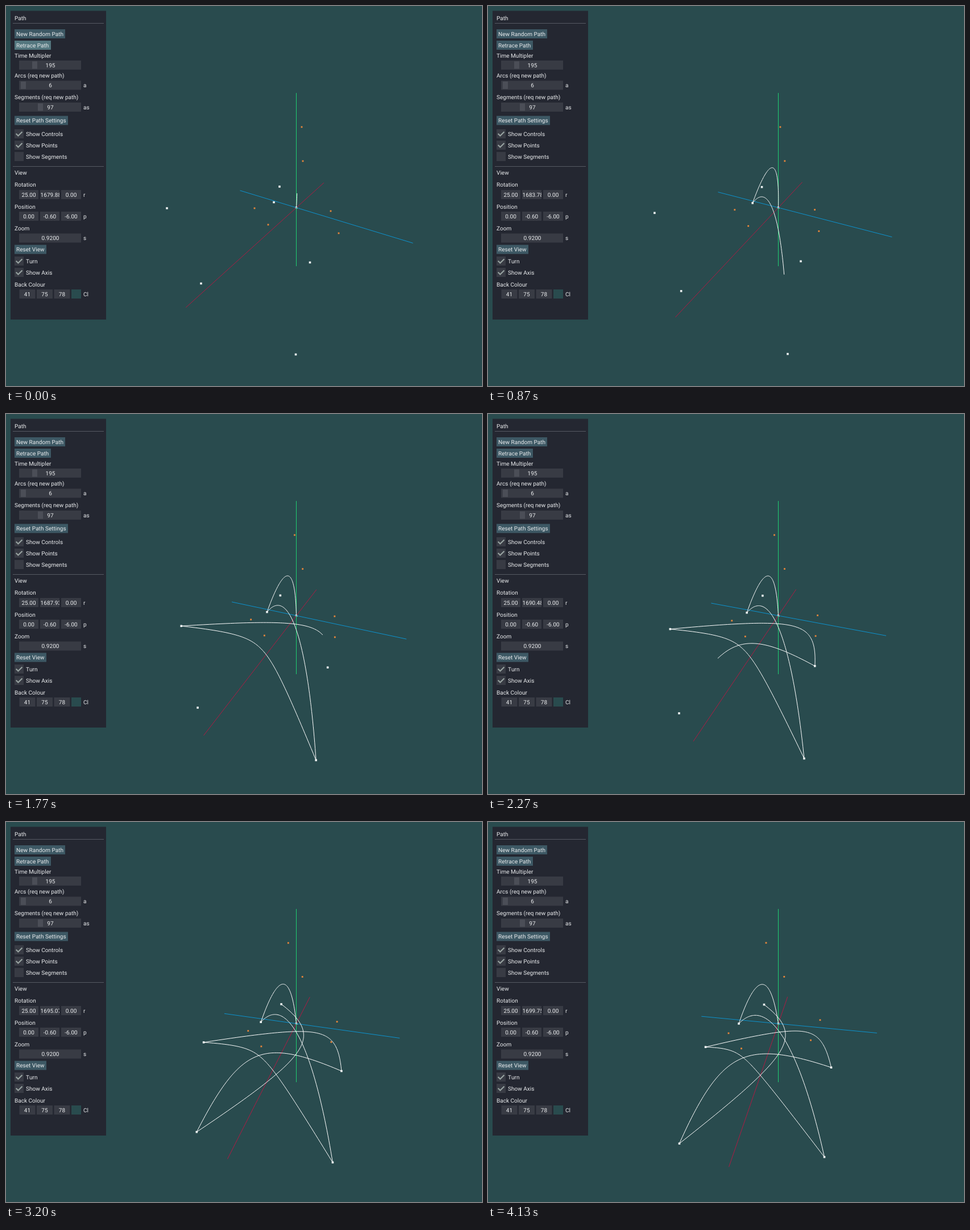
Recreate the animation shown at these times as an HTML page with a canvas. Size 837 px wide and 669 px high, loop 4.16 s.

```html
<!DOCTYPE html>
<html lang="en">
<head>
<meta charset="utf-8">
<title>Path viewer</title>
<style>
html, body { margin: 0; width: 100%; height: 100%; overflow: hidden; background: #294b4e; }
canvas, #panel { position: absolute; left: 0; top: 0; }
text {
  font: 10.05px Roboto, sans-serif; font-kerning: none;
  text-rendering: geometricPrecision; fill: #e9ebed; white-space: pre;
}
</style>
</head>
<body>
<canvas id="scene" width="837" height="669"></canvas>
<svg id="panel" width="837" height="669"></svg>
<script>
const LOOP = 4160, SEGMENTS = 97, ARCS_PER_MS = 0.00201, FIRST_ARC = 0.09;
const HOVER_END = 130;
const PITCH = 25 * Math.PI / 180, SCALE = 0.92, SHIFT_Y = -0.6, DISTANCE = 6;
const CENTER = [510.5, 334.4], FOCAL = [201.4, 206];
const BUTTON = '#3d5864', BUTTON_HOVER = '#54777f', FIELD = '#383b44', GRAB = '#4b4e57';

// ---- Control panel ----
const panel = document.getElementById('panel');

function add(tag, attrs, parent = panel) {
  const node = document.createElementNS('http://www.w3.org/2000/svg', tag);
  for (const key in attrs) node.setAttribute(key, attrs[key]);
  return parent.appendChild(node);
}
const rect = (x, y, width, height, fill) => add('rect', { x, y, width, height, fill });

// y is the vertical middle of the text
function label(x, y, str, anchor = 'start', parent = panel) {
  const node = add('text', { x, y: y + 3.6, 'text-anchor': anchor }, parent);
  node.textContent = str;
  return node;
}
function button(y, width, str) {
  const box = rect(15, y - 8, width, 16, BUTTON);
  label(18, y, str);
  return box;
}
function field(x, y, width, str) {
  rect(x, y - 8, width, 16, FIELD);
  label(x + width / 2, y, str, 'middle');
}
function slider(y, str, grab) {
  rect(23, y - 8, 109, 16, FIELD);
  if (grab) rect(grab, y - 6.5, 9, 13, GRAB);
  label(78, y, str, 'middle');
}
function checkbox(y, str, checked) {
  rect(15, y - 8, 16, 16, FIELD);
  if (checked) add('path', {
    d: `M17.7 ${y - 0.2}l3.7 3.7l7.1-7.1`, fill: 'none', stroke: '#98a3a1', 'stroke-width': 2.1
  });
  label(35, y, str);
}

rect(8, 8.5, 168, 543.5, '#242731');
rect(12, 30, 160, 1, '#565a63');
rect(12, 282, 160, 1, '#565a63');

label(15, 21.5, 'Path');
button(49, 89, 'New Random Path');
const retrace = button(69, 64, 'Retrace Path');
label(15, 87, 'Time Multipler');
slider(104, '195', 46);
label(15, 122, 'Arcs (req new path)');
slider(139.5, '6', 26);
label(136, 139.5, 'a');
label(15, 160.5, 'Segments (req new path)');
slider(178, '97', 56);
label(136, 178, 'as');
button(201.5, 94, 'Reset Path Settings');
checkbox(225, 'Show Controls', true);
checkbox(245, 'Show Points', true);
checkbox(265, 'Show Segments', false);

label(15, 293, 'View');
label(15, 314.5, 'Rotation');
field(23, 332, 34, '25.00');
field(60, 332, 34, '');
field(97, 332, 35, '0.00');
const yawBox = add('svg', { x: 60, y: 324, width: 34, height: 16 });
const yawText = label(0.6, 8, '', 'start', yawBox);
label(136, 332, 'r');
label(15, 353, 'Position');
field(23, 370, 34, '0.00');
field(60, 370, 34, '-0.60');
field(97, 370, 35, '-6.00');
label(136, 370, 'p');
label(15, 391.5, 'Zoom');
slider(408.5, '0.9200');
label(136, 408.5, 's');
button(428.5, 56, 'Reset View');
checkbox(449, 'Turn', true);
checkbox(469, 'Show Axis', true);
label(15, 490, 'Back Colour');
field(23.5, 507, 28, '41');
field(54, 507, 28, '75');
field(84.5, 507, 28, '78');
rect(115, 499, 17, 16, '#294b4e');
label(136, 507, 'Cl');

// ---- 3D scene ----
const points = [
  [0, 0, 0], [-2.73, -2.036, 4.17], [3.873, -2.426, -2.227], [4.486, 2.223, 0.234],
  [2.917, 0.461, -2.116], [4.323, -3.172, 3.188], [0.688, 1.364, 0.56]
];
const controls = [
  [-3.206, 4.228, 1.429], [-0.181, 2.511, -0.257], [-0.361, -2.57, 2.815],
  [0.757, 0.844, -2.05], [0.621, -0.567, 2.83], [-2.29, -2.625, -2.263]
];
const axes = [
  { dir: [5, 0, 0], color: '#b01a43' },
  { dir: [0, 0, 5], color: '#0d93cf' },
  { dir: [0, 5, 0], color: '#1fce72' }
];
const yawKeys = [
  [0, 1679.88], [870, 1683.78], [1770, 1687.92], [2270, 1690.47],
  [2770, 1693.0], [3670, 1697.32], [4130, 1699.74], [4160, 1699.9]
];
const ctx = document.getElementById('scene').getContext('2d');
ctx.lineJoin = 'bevel';

function yawAt(t) {
  const i = yawKeys.findIndex(key => key[0] > t);
  const [t0, a] = yawKeys[i - 1], [t1, b] = yawKeys[i];
  return a + (b - a) * (t - t0) / (t1 - t0);
}

function projector(yaw) {
  const c = Math.cos(yaw), s = Math.sin(yaw);
  const cp = Math.cos(PITCH), sp = Math.sin(PITCH);
  return point => {
    const [x, y, z] = point.map(v => v * SCALE);
    const depth = z * c - x * s;
    const d = DISTANCE - y * sp - depth * cp;
    return [
      CENTER[0] + FOCAL[0] * (x * c + z * s) / d,
      CENTER[1] - FOCAL[1] * (y * cp - depth * sp + SHIFT_Y) / d
    ];
  };
}

function polyline(pts, color) {
  ctx.strokeStyle = color;
  ctx.beginPath();
  pts.forEach(p => ctx.lineTo(...p));
  ctx.stroke();
}

function dot([x, y], size, color) {
  ctx.fillStyle = color;
  ctx.fillRect(x - size / 2, y - size / 2, size, size);
}

function pathPoint(step) {
  const i = Math.min(Math.floor(step / SEGMENTS), controls.length - 1);
  const t = step / SEGMENTS - i, u = 1 - t;
  return controls[i].map((v, k) =>
    u * u * points[i][k] + 2 * u * t * v + t * t * points[i + 1][k]);
}

function draw(now) {
  const t = now % LOOP, yaw = yawAt(t);
  const project = projector(yaw * Math.PI / 180);
  yawText.textContent = yaw.toFixed(2);
  retrace.setAttribute('fill', t < HOVER_END ? BUTTON_HOVER : BUTTON);

  ctx.clearRect(0, 0, 837, 669);
  points.forEach(p => dot(project(p), 3.6, '#ecf1f1'));
  controls.forEach(p => dot(project(p), 2.8, '#e8863a'));
  for (const { dir, color } of axes) {
    polyline([project(dir.map(v => -v)), project(dir)], color);
  }

  const arcs = Math.min(FIRST_ARC + t * ARCS_PER_MS, controls.length);
  const steps = Math.floor(arcs * SEGMENTS);
  const trail = Array.from({ length: steps + 1 }, (_, i) => project(pathPoint(i)));
  polyline(trail, '#fff');
  requestAnimationFrame(draw);
}
requestAnimationFrame(draw);
</script>
</body>
</html>
```
